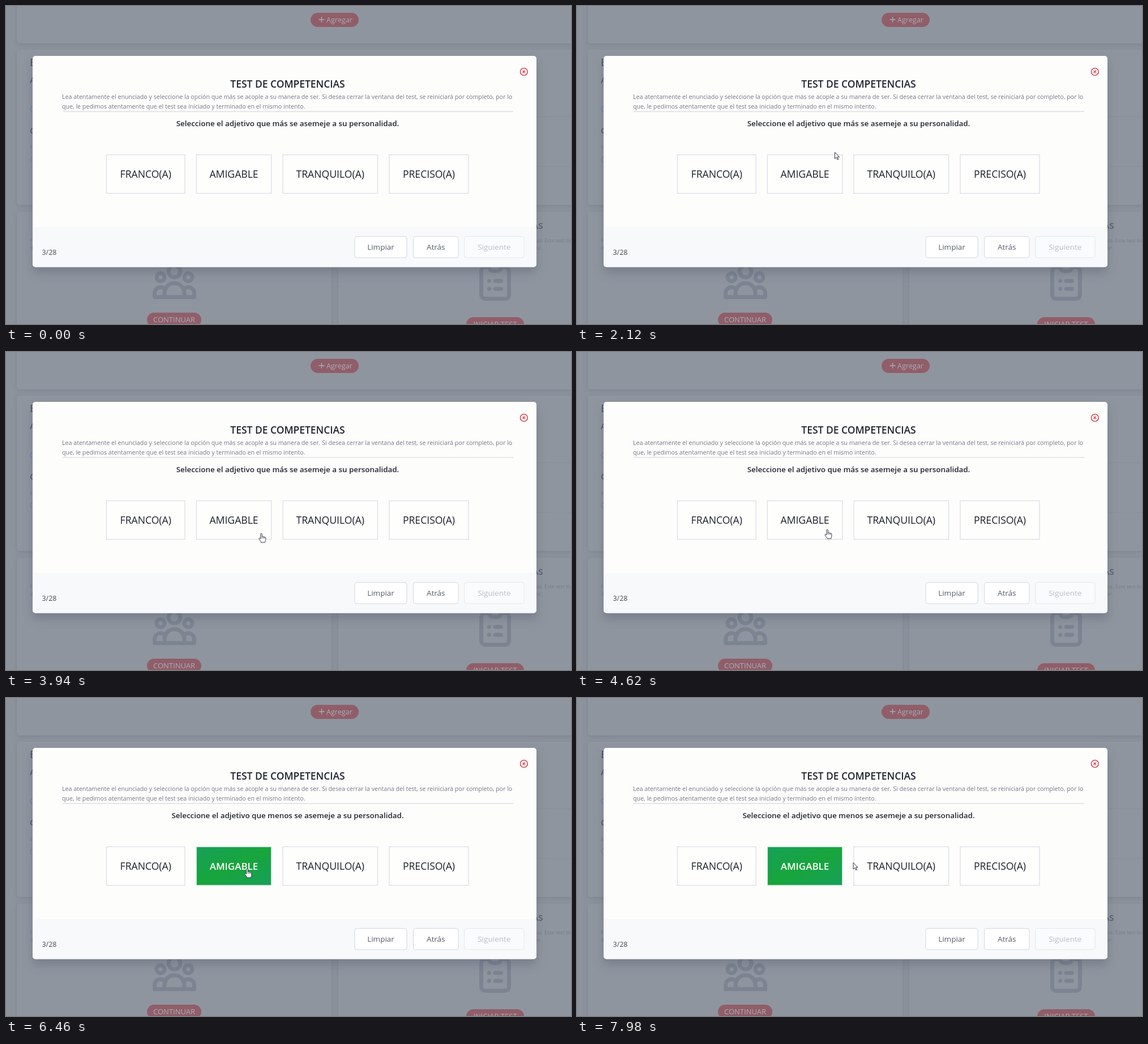
Animation of 998x561 px, one loop 8000 ms. Source, as an HTML page:

```html
<!DOCTYPE html>
<html lang="es">
<head>
<meta charset="utf-8">
<title>Test de competencias</title>
<style>
  html, body { margin: 0; width: 100%; height: 100%; overflow: hidden; background: #8c939d; }
  svg { display: block; width: 100vw; height: 100vh; font-family: "Open Sans", "Noto Sans", sans-serif; }
  .mid { text-anchor: middle; }
  .card { fill: #8f959f; filter: drop-shadow(0 2px 3px #70788680); }
  .pill { fill: #905e69; }
  .pill-text { fill: #a9adb7; font-size: 13px; }
  .icon { fill: none; stroke: #7c8492; stroke-width: 2; stroke-linecap: round; stroke-linejoin: round; }
  .heading { fill: #555b69; font-size: 15px; font-weight: 600; }
  .faint { fill: #767d8a; font-size: 9px; }
  .note { fill: #747985; font-size: 10.66px; }
  .strong { fill: #20242d; font-weight: 600; }
  .option rect { fill: #fefefd; stroke: #dcdfe9; stroke-width: 1.3; }
  .option text { fill: #1c2027; font-size: 17.6px; }
  .option.chosen rect { fill: url(#green); stroke: #d9eadf; }
  .option.chosen text { fill: #fff; font-size: 17px; font-weight: 600; }
  .button rect { fill: #fff; stroke: #d3d7e2; }
  .button text { fill: #545a67; font-size: 13.5px; }
  .button.off rect { fill: #f9fbfd; stroke: #e3e8f0; }
  .button.off text { fill: #b9bec8; }
  .pointer { fill: #fff; stroke: #30343c; stroke-linejoin: round; }
</style>
</head>
<body>
<svg viewBox="0 0 998 561" preserveAspectRatio="none">
  <defs>
    <linearGradient id="green" x2="1" y2="1">
      <stop offset="0" stop-color="#16a05a"/>
      <stop offset=".5" stop-color="#18a53c"/>
      <stop offset="1" stop-color="#16a05a"/>
    </linearGradient>
  </defs>

  <!-- Dimmed page -->
  <rect width="998" height="561" fill="#8c939d"/>
  <rect class="card" x="19" y="-20" width="1000" height="86" rx="5"/>
  <rect class="card" x="19" y="77" width="1000" height="274" rx="5"/>
  <rect class="card" x="19" y="363" width="556" height="220" rx="5"/>
  <rect class="card" x="587" y="363" width="430" height="220" rx="5"/>
  <path d="M43 195H998M43 283H998" stroke="#888e99"/>
  <g class="heading">
    <text x="42" y="106" font-size="18">Evaluación</text>
    <text x="42" y="136">Avance</text>
    <text x="42" y="225">Competencias</text>
    <text x="948.5" y="393" text-anchor="end">COMPETENCIAS</text>
  </g>
  <circle cx="48" cy="182" r="5" fill="none" stroke="#5c7cb2"/>
  <circle cx="48" cy="271" r="5" fill="none" stroke="#767d8a"/>
  <g class="faint">
    <text x="42" y="252">Inicio</text>
    <text x="42" y="417">Formulario</text>
    <text x="42" y="430">de datos</text>
    <text x="937" y="417">as. Este test tiene</text>
    <text x="936" y="430">or.</text>
  </g>
  <rect class="pill" x="538" y="12" width="85" height="25" rx="12.5"/>
  <path d="M552.5 24h10m-5-5v10" stroke="#a9adb7" stroke-width="1.3"/>
  <text class="pill-text" x="566" y="28.6" style="font-size:12.6px">Agregar</text>
  <rect class="pill" x="249" y="541" width="96" height="25" rx="12.5"/>
  <text class="pill-text mid" x="297" y="557.5">CONTINUAR</text>
  <rect class="pill" x="813" y="549" width="102" height="25" rx="12.5"/>
  <text class="pill-text mid" x="864" y="566">INICIAR TEST</text>
  <path class="icon" transform="translate(255.5 443.5) scale(3.5)" d="M17 20h5v-2a3 3 0 0 0-5.36-1.86M17 20H7m10 0v-2c0-.66-.13-1.28-.36-1.86M7 20H2v-2a3 3 0 0 1 5.36-1.86M7 20v-2c0-.66.13-1.28.36-1.86m0 0a5 5 0 0 1 9.28 0M15 7a3 3 0 1 1-6 0 3 3 0 0 1 6 0zm6 3a2 2 0 1 1-4 0 2 2 0 0 1 4 0zM7 10a2 2 0 1 1-4 0 2 2 0 0 1 4 0z"/>
  <path class="icon" transform="translate(822 443) scale(3.5)" d="M9 5H7a2 2 0 0 0-2 2v12a2 2 0 0 0 2 2h10a2 2 0 0 0 2-2V7a2 2 0 0 0-2-2h-2M9 5a2 2 0 0 0 2 2h2a2 2 0 0 0 2-2M9 5a2 2 0 0 1 2-2h2a2 2 0 0 1 2 2m-3 7h3m-3 4h3m-6-4h.01M9 16h.01"/>

  <!-- Dialog -->
  <rect x="47" y="88" width="890" height="372.5" rx="5" fill="#fdfdfc" style="filter:drop-shadow(0 10px 8px #4a506050)"/>
  <path d="M47 390H937V455.5a5 5 0 0 1-5 5H52a5 5 0 0 1-5-5z" fill="#f8f9fa"/>
  <g fill="none" stroke="#d3303c" stroke-width="1.4" stroke-linecap="round">
    <circle cx="914.8" cy="116" r="6.4"/>
    <path d="M913 114.2l3.6 3.6m0-3.6l-3.6 3.6"/>
  </g>
  <text class="strong mid" x="497.5" y="144" font-size="17.45">TEST DE COMPETENCIAS</text>
  <text class="note" x="99" y="164">Lea atentamente el enunciado y seleccione la opción que más se acople a su manera de ser. Si desea cerrar la ventana del test, se reiniciará por completo, por lo</text>
  <text class="note" x="99" y="180.6">que, le pedimos atentamente que el test sea iniciado y terminado en el mismo intento.</text>
  <path d="M100 186.2H896" stroke="#d8dae2" stroke-width="1.2"/>
  <text id="prompt" class="strong mid" x="497.5" y="212" font-size="13.4"></text>
  <text x="63.5" y="438.7" font-size="12.4" fill="#454a55">3/28</text>
  <g id="controls"></g>

  <!-- Both pointers have their tip at 0,0 -->
  <path id="arrow" class="pointer" d="M0 0V11.5L2.7 9l1.9 4.2 1.8-.8L4.6 8.3H8z"/>
  <g id="hand" class="pointer">
    <path d="M-1.3 1.2C-1.3-.4 1.2-.4 1.2 1.2V6C1.4 4.8 3.5 5 3.5 6.4 3.9 5.4 5.6 5.7 5.7 7 6.2 6.2 7.7 6.5 7.7 8V11.5C7.7 13.2 6.6 14 6.5 16H-.3C-.4 13.8-2.7 12.3-4 9.8-4.6 8.4-3 7.6-2 8.8L-1.3 9.6z"/>
    <path d="M1.2 6V9M3.5 6.4V9M5.7 7V9" fill="none" stroke-width=".8"/>
  </g>
</svg>
<script>
const LOOP = 8000, ENTER = 1220, CHOOSE = 6000;
const byId = id => document.getElementById(id);

function box(kind, label, x, y, width, height, radius, baseline) {
  const group = document.createElementNS("http://www.w3.org/2000/svg", "g");
  group.setAttribute("class", kind);
  group.innerHTML = `<rect x="${x}" y="${y}" width="${width}" height="${height}" rx="${radius}"/>
    <text class="mid" x="${x + width / 2}" y="${baseline}">${label}</text>`;
  byId("controls").append(group);
  return group;
}

const options = [
  ["FRANCO(A)", 177.5, 138.5], ["AMIGABLE", 336.3, 132.4],
  ["TRANQUILO(A)", 489, 167.5], ["PRECISO(A)", 677, 140]
].map(([label, x, width]) =>
  ({ x, width, node: box("option", label, x, 262.5, width, 68, 0, 302.5) }));

box("button", "Limpiar", 616, 406.5, 92, 37.5, 4, 429.5);
box("button", "Atrás", 719.5, 406.5, 79.5, 37.5, 4, 429.5);
box("button off", "Siguiente", 809.5, 406.5, 105.5, 37.5, 4, 429.5);

// Pointer stops: time, x, y
const path = [
  [ENTER, 775, 0], [1420, 743.5, 72], [2450, 364, 317], [2900, 364, 317],
  [3700, 451, 320], [4300, 451, 320], [5100, 426, 301], [7300, 426, 301], [7900, 488, 290.5]
];

function pointerAt(t) {
  const next = path.findIndex(stop => stop[0] > t);
  if (next < 0) return path.at(-1).slice(1);
  const [t0, x0, y0] = path[next - 1], [t1, x1, y1] = path[next];
  const u = (t - t0) / (t1 - t0), eased = u * u * (3 - 2 * u);
  return [x0 + (x1 - x0) * eased, y0 + (y1 - y0) * eased];
}

function draw(now) {
  const t = now % LOOP, chosen = t >= CHOOSE;
  byId("prompt").textContent =
    `Seleccione el adjetivo que ${chosen ? "menos" : "más"} se asemeje a su personalidad.`;
  options[1].node.classList.toggle("chosen", chosen);

  const visible = t >= ENTER;
  const [x, y] = visible ? pointerAt(t) : [0, 0];
  const hovering = y > 262 && y < 331 && options.some(o => x > o.x && x < o.x + o.width);
  for (const [id, shown] of [["arrow", !hovering], ["hand", hovering]]) {
    byId(id).setAttribute("transform", `translate(${x} ${y})`);
    byId(id).style.display = visible && shown ? "" : "none";
  }
  requestAnimationFrame(() => draw(performance.now()));
}
draw(0);
</script>
</body>
</html>
```
